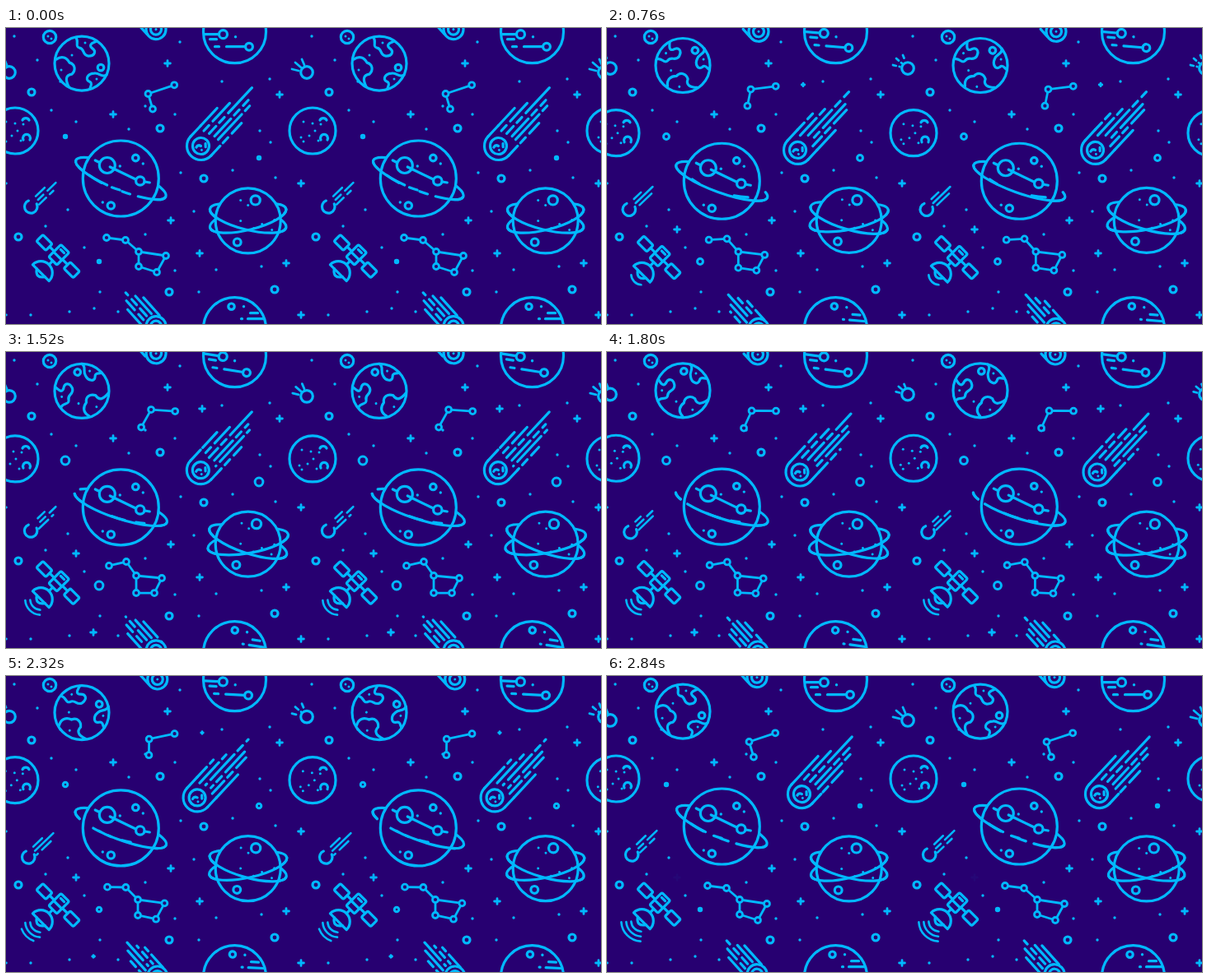
Recreate the animation shown at these times as an HTML page. Size 722 px wide and 360 px high, loop 2.88 s.

```html
<!DOCTYPE html>
<html lang="en">
<head>
<meta charset="utf-8">
<title>Space pattern</title>
<style>
  html, body { margin: 0; width: 100%; height: 100%; overflow: hidden; background: #270071; }
  svg { display: block; width: 722px; height: 360px; }
</style>
</head>
<body>
<svg viewBox="0 0 722 360" fill="none" stroke="#00b9ff" stroke-width="3.2" stroke-linecap="round" stroke-linejoin="round">
  <defs>
    <clipPath id="front"><rect x="-80" y="0" width="160" height="60"/></clipPath>
    <g id="tile"></g>
  </defs>
  <g id="copies"></g>
</svg>
<script>
const LOOP = 2880, STEP = 40, SIZE = 361;
const BG = '#270071', FG = '#00b9ff';
const tile = document.getElementById('tile');

let copies = '';
for (const y of [-SIZE, 0, SIZE])
  for (const x of [-SIZE, 0, SIZE, 2 * SIZE]) copies += `<use href="#tile" x="${x}" y="${y}"/>`;
document.getElementById('copies').innerHTML = copies;

const ring = (x, y, r, attr = '') => `<circle cx="${x}" cy="${y}" r="${r}" ${attr}/>`;
const disc = (x, y, r) => ring(x, y, r, `fill="${BG}"`);
const dot = (x, y, r = 1.7) => ring(x, y, r, `fill="${FG}" stroke="none"`);
const path = (d, attr = '') => `<path d="${d}" ${attr}/>`;
const line = (x1, y1, x2, y2, attr) => path(`M${x1} ${y1}L${x2} ${y2}`, attr);
const box = (x, y, w, h) =>
  `<rect x="${x - w / 2}" y="${y - h / 2}" width="${w}" height="${h}" rx="2" fill="${BG}"/>`;
const at = (x, y, turn, body, attr = '') =>
  `<g transform="translate(${x} ${y}) rotate(${turn})" ${attr}>${body}</g>`;
const plus = (x, y, s = 1, alpha = 1) => s < 0.05 ? '' :
  path(`M${x - 3.4 * s} ${y}h${6.8 * s}M${x} ${y - 3.4 * s}v${6.8 * s}`, `stroke-width="2.8" opacity="${alpha}"`);
const clamp = v => Math.max(0, Math.min(1, v));
const ramp = (t, a, b) => clamp((t - a) / (b - a));

const dots = [[38,39],[66,65],[55,100],[85,114],[205,105],[149,123],[169,95],[262,65],[320,62],
  [308,125],[321,139],[212,176],[275,173],[327,182],[228,223],[75,221],[48,241],[169,251],
  [95,267],[205,295],[255,294],[310,290],[234,321],[114,321],[136,345],[30,349],[77,345],[10,10],[211,17]];
const pluses = [[196,43],[130,105],[332,81],[200,234],[235,274],[340,286],[358,189],[358,349]];
const donuts = [[31,78],[187,122],[240,183],[198,321],[326,318],[15,254]];

function stars(t, c) {
  const bump = (a, b, d, e) => ramp(t, a, b) * (1 - ramp(t, d, e));
  let s = dots.map(p => dot(...p)).join('') + pluses.map(p => plus(...p)).join('');
  s += donuts.map(([x, y]) => ring(x, y, 4)).join('');
  for (const [x, y] of [[72,132],[307,158],[113,284]]) s += ring(x, y, 3.3 - 1.6 * c, 'stroke-width="3"');
  s += plus(238, 69, bump(500, 1000, 2100, 2450));
  s += plus(85, 245, 1, bump(200, 640, 2300, 2860));
  s += dot(107, 341) + plus(106, 341, bump(800, 1120, 2100, 2450));
  return s + ring(53, 11, 7.7) + dot(51, 10, 1.5) + dot(55, 13, 1.5);
}

function chain(nodes, order) {
  const d = 'M' + order.map(i => nodes[i].join(' ')).join('L');
  return path(d, 'stroke-width="2.8"') +
    nodes.map(([x, y]) => ring(x, y, 3.5, `fill="${BG}" stroke-width="2.8"`)).join('');
}

function earth(c) {
  const land = path('M-31 -5C-24 -10 -18 -7 -15 -1C-8 1 -7 8 -12 13C-20 14 -20 20 -16 28') +
    path('M-7 -31C-3 -26 -9 -21 -3 -19C4 -18 0 -10 8 -9C16 -9 18 -15 12 -19C8 -23 13 -25 18 -27') +
    path('M30 14C24 18 22 11 15 12C8 12 3 19 9 22C14 24 10 28 10 31');
  return at(92, 45.3 - 2.2 * c, 0, disc(0, 0, 33) + at(0, 0, -58 + 58 * c,
    land + ring(23, 5, 3.8) + dot(-25, 8, 1.5) + dot(-12, -10, 1.5) + dot(4, -25, 1.5) + dot(18, 19, 1.5)));
}

function moon(c) {
  const spots = [[-15,8],[-5,6],[2,0],[-12,13],[9,-8],[-12,-11],[-1,-9],[6,12]];
  return at(11, 127.5 - 2.5 * c, 0, disc(0, 0, 28) +
    path('M9 -13a4.5 4.5 0 0 1 8 0M10 11a4.5 4.5 0 1 1 8 0') +
    spots.map(([x, y]) => dot(x + c, y, 1.5)).join(''));
}

// A tilted ring: dashed ellipse behind the planet, its near half in front.
function orbit(rx, ry, turn, attr = '') {
  const e = path(`M${rx} 0A${rx} ${ry} 0 0 1 ${-rx} 0A${rx} ${ry} 0 0 1 ${rx} 0`, `pathLength="100" ${attr}`);
  return [at(0, 0, turn, e), at(0, 0, turn, `<g clip-path="url(#front)">${e}</g>`)];
}

function giant(p, c) {
  const turned = 100 * (p + 0.12 * Math.sin(Math.PI * p) ** 2);
  const [back, near] = orbit(58.8, 14, 20 + 2 * c,
    `stroke-dasharray="84 4 4 8" stroke-dashoffset="${70 + turned}"`);
  const inner = path('M-42 -7Q-12 18 38 20',
    `pathLength="100" stroke-dasharray="20 16 12 52" stroke-dashoffset="${-6 + turned}"`);
  const marks = ring(-16.5, -16, 9.5) + line(-13, -14, 18, 1) + ring(23.5, 3, 5.2, `fill="${BG}"`) +
    line(29, 4, 35, 5) + line(-31, -22, -27, -20) + ring(18, -25, 3.8) + ring(-12, 33, 4.2) +
    dot(27, -18) + dot(-22, 29) + dot(-1, -15);
  return at(139.3, 186 - 3 * c, 0, back + disc(0, 0, 46) + marks + inner + near);
}

function ringed(c) {
  const open = (1 - c) / 2;
  const a = orbit(47.5 + 2 * open, 14, -14 + 4 * open);
  const b = orbit(47.5 + 2 * open, 14, 14 + 5 * open);
  const spots = [[-9,-25],[0,-19],[-9,0],[32,-1],[7,9],[17,4],[29,11]];
  const face = ring(9, -25, 5.6) + ring(-13, 26, 4.4) + spots.map(([x, y]) => dot(x, y, 1.5)).join('');
  return at(293.7, 234 + 0.4 * c, 0, at(0, -3, 0, a[0] + b[0]) + disc(0, 0, 39.5) +
    at(0, 0, 3 * open, face) + at(0, -3, 0, a[1] + b[1]));
}

function banded(c) {
  return at(277.5, 4.7, 0, disc(0, 0, 38) + at(0, 0, 4.5 * (1 - c),
    line(-36, 3, -20, 3) + line(-30, 9, -22, 9) + ring(-14, 3, 5) + line(-10, 18, 13, 18) +
    ring(17.5, 18, 4.4) + line(-24, 18, -19, 18) + ring(-4, -27, 3.7) + line(16, -12, 35, -12) +
    line(8, -12, 9, -12) + line(19, -19, 28, -19) + dot(1, 6) + dot(11, -27)));
}

// Tail streaks are [side, start, end]; breaks run outwards along them.
function tail(streaks, q, width) {
  return streaks.map(([y, a, b], i) => line(a, y, b, y,
    `stroke-width="${width}" stroke-dasharray="42 6 9 7" stroke-dashoffset="${-64 * q - 17 * i}"`)).join('');
}

function comets(q, d) {
  const arc = r => path(`M0 ${-r}A${r} ${r} 0 0 0 0 ${r}`);
  const big = arc(17) + line(0, -17, 18, -17) + line(0, 17, 16, 17) + ring(0, 0, 10) +
    path('M-5 -3Q-1 -4 0 0M3 5L6 2') + dot(-3, 4, 1.5) +
    tail([[-17,18,47],[-10,15,62],[-3,18,94],[4,20,80],[10,16,76],[17,16,54]], q, 3.2);
  const low = ring(0, 0, 12) + ring(0, 0, 6.5) + dot(0, 0, 1.5) +
    tail([[-12,3,38],[-6,15,47],[0,17,55],[6,15,44],[12,3,36]], q, 3.2);
  const small = path('M3 -7.2A7.8 7.8 0 1 0 7.4 2.5') + tail([[-5,13,28],[0,11,42],[5,9,33]], q, 2.6);
  const rays = [[-18,-4,-10,-2],[-14,-12,-7,-6],[-6,-16,-3,-9]].map(v => line(...v,
    `stroke-width="2.8" stroke-dasharray="11 4" stroke-dashoffset="${-15 * q}"`)).join('');
  return at(234 + 2.5 * d, 146 - 2.5 * d, -47, big) +
    at(183 - d, 364 - 1.3 * d, 228, low) +
    at(28.5 + 1.7 * d, 219 - 1.7 * d, -44, small) +
    at(4, 51.5 + 2.5 * d, 0, ring(0, 0, 7.3) + rays);
}

function satellite(t, c) {
  const craft = line(-24, 0, 24, 0) + box(-23, 1, 16, 11) + box(24, 1, 16, 11) +
    line(0, 6, 0, 20) + box(0, -1, 14, 21) + line(-7, 1, 7, 1) + line(-3, -7, 3, -7) +
    path('M-14 30A14 14 0 0 1 14 30Z', `fill="${BG}"`) + path('M-7 30Q0 40 7 30');
  const waves = [[13, 330], [19, 1280], [25, 2180]].map(([r, from]) => {
    const half = 0.72 * ramp(t, from, from + 240);
    if (!half) return '';
    const x = r * Math.sin(half), y = 30 + r * Math.cos(half);
    return path(`M${-x} ${y}A${r} ${r} 0 0 0 ${x} ${y}`, 'stroke-width="2.6"');
  }).join('');
  return at(63.5, 278 - 1.5 * c, 45, craft + waves);
}

function draw(t) {
  const p = t / LOOP, q = (2 * p) % 1;
  const c = Math.cos(2 * Math.PI * p), d = Math.cos(4 * Math.PI * p);
  tile.innerHTML = stars(t, c) +
    chain([[204.7 - 0.5 * c, 70.7 - 1.4 * c], [174.3 - 1.8 * c, 75 + 5 * c], [171 + 7 * c, 95 + 3.5 * c]], [0, 1, 2]) +
    chain([[123.5 - 1.5 * c, 257.5 - 2.5 * c], [145.5 - 0.5 * c, 256.5 + 1.5 * c], [159.5 + 1.5 * c, 272],
      [191.5 + 2.5 * c, 276 + c], [181.5 + 1.5 * c, 295 + 2 * c], [159.5 + 1.5 * c, 291.5 - 1.5 * c]],
      [0, 1, 2, 3, 4, 5, 2]) +
    earth(c) + moon(c) + giant(p, c) + ringed(c) + banded(c) + comets(q, d) + satellite(t, c);
}

const start = performance.now();
function tick() {
  const t = (performance.now() - start) % LOOP;
  draw(Math.floor(t / STEP) * STEP);
  requestAnimationFrame(tick);
}
tick();
</script>
</body>
</html>
```
